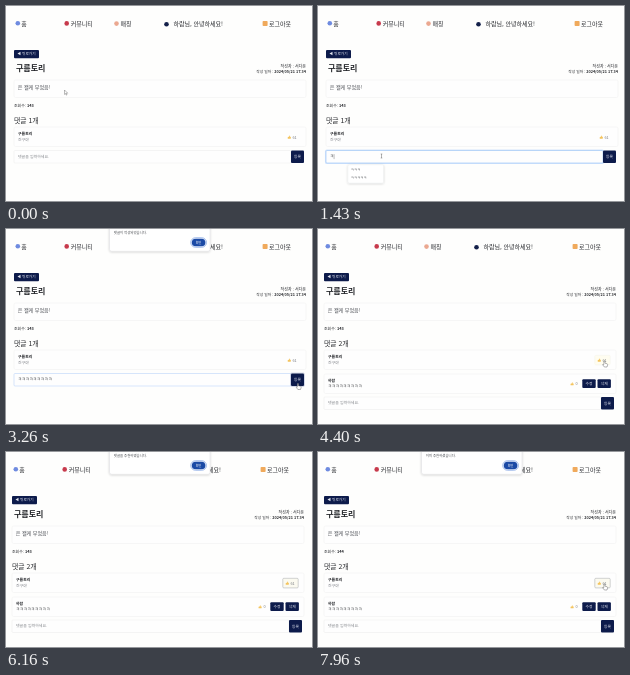
These frames come from a looping animation (306x195 px, 8000 ms). An HTML page:

```html
<!DOCTYPE html>
<html lang="ko">
<head>
<meta charset="utf-8">
<title>댓글</title>
<style>
html, body { margin: 0; width: 100%; height: 100%; overflow: hidden; background: #fefefd; }
svg { display: block; width: 100vw; height: 100vh; }
text { font-family: "Noto Sans CJK KR", "Noto Sans CJK", "Noto Sans", sans-serif; white-space: pre; }
</style>
</head>
<body>
<svg viewBox="0 0 306 195">
  <defs>
    <filter id="shadow" x="-10%" y="-20%" width="120%" height="150%">
      <feDropShadow dx="0" dy="0.6" stdDeviation="1" flood-opacity="0.2"/>
    </filter>
  </defs>
  <g id="page"></g>
  <g id="dialog"></g>
  <g id="pointer"></g>
</svg>
<script>
const LOOP = 8000;
const NAVY = '#0d1b4b', INK = '#25272b', GRAY = '#777a80', LINE = '#eeefef';
const USER = '하람', AUTHOR = '서다온', TITLE = '구름토리', LAUGH = 'ㅋ';

const FOCUS = 740, TYPING = 1360, CLICK = 2880, POSTED = 3700, LIKED = 6800;
const ALERTS = [
  { from: 3000, to: 3600, text: '댓글이 작성되었습니다.' },
  { from: 4750, to: 6400, text: '댓글을 추천하였습니다.' },
  { from: 7250, to: LOOP, text: '이미 추천하셨습니다.' }
];
// time, x, y
const PATH = [
  [0, 58.5, 84], [150, 58.5, 84], [650, 63.5, 150], [2300, 63.5, 150],
  [2650, 291.5, 154.5], [3620, 291.5, 154.5], [4100, 286, 132], [LOOP, 286, 132]
];

const el = id => document.getElementById(id);

// y is the vertical middle of the line
const text = (str, x, y, size, { fill = INK, weight = 400, anchor = 'start' } = {}) =>
  `<text x="${x}" y="${y + size * 0.36}" font-size="${size}" fill="${fill}" font-weight="${weight}" text-anchor="${anchor}">${str}</text>`;

const rect = (x, y, w, h, fill, { stroke = 'none', r = 1, line = 0.5, extra = '' } = {}) =>
  `<rect x="${x}" y="${y}" width="${w}" height="${h}" rx="${r}" fill="${fill}" stroke="${stroke}" stroke-width="${line}" ${extra}/>`;

const circle = (x, y, r, fill) => `<circle cx="${x}" cy="${y}" r="${r}" fill="${fill}"/>`;

const button = (label, x, y, w, h, size = 3.8) =>
  rect(x, y, w, h, NAVY) +
  text(label, x + w / 2, y + h / 2, size, { fill: '#e3e6f0', weight: 500, anchor: 'middle' });

const card = (y, h) => rect(8, y, 292, h, '#fefefe', { stroke: LINE, r: 1.5 });

const thumb = (x, y) =>
  `<path transform="translate(${x} ${y}) scale(.8)" fill="#f4c45e" d="M-1.8 -.2h1L.2 -2q.9 0 .6 1.5h1.1q.5.4 0 2.4h-3.7z"/>`;

function nav() {
  const label = (str, x) => text(str, x, 17.4, 6, { weight: 500 });
  return circle(11.8, 17.3, 2.3, '#6f8be0') + label('홈', 15.3) +
    circle(60.7, 17.4, 2.3, '#c73a4c') + label('커뮤니티', 64.8) +
    circle(110.5, 17.6, 2.3, '#eba890') + label('매칭', 114.5) +
    circle(160.5, 18.2, 2.3, '#14204a') + label(`${USER}님, 안녕하세요!`, 167.5) +
    rect(256.6, 15, 5, 5, '#f0aa5c', { r: 0.8 }) + label('로그아웃', 263);
}

function article(views) {
  const right = { anchor: 'end' };
  return button('◀ 뒤로가기', 8, 44, 25, 8.3, 3.7) +
    text(TITLE, 10, 62, 8, { weight: 700 }) +
    text(`작성자 : ${AUTHOR}`, 300, 60.2, 4, right) +
    text('작성 일자 : <tspan font-weight="700">2024/05/21 17:34</tspan>', 300, 66, 3.75, right) +
    card(74, 17.5) + text('은 왤케 부었음!', 11.8, 81, 5.1, { fill: '#4b4e54', weight: 500 }) +
    text(`조회수: <tspan font-weight="700">${views}</tspan>`, 8, 99.7, 3.9);
}

function likeBox(state) {
  if (!state) return '';
  const pressed = state === 2;
  return rect(278.8, 126.3, 15.4, 9.6, pressed ? '#fbfaf0' : '#fffdf0',
    { stroke: pressed ? '#a3a6aa' : '#f3f3ec' });
}

function comments(s) {
  let out = text(`댓글 ${s.posted ? 2 : 1}개`, 8, 115, 6.8) + card(121, 19.5) +
    text(TITLE, 12, 127.4, 3.9, { weight: 700 }) +
    text('친구야', 12, 133.6, 3.9, { fill: GRAY }) +
    likeBox(s.like) + thumb(283.2, 131.2) + text('61', 286.5, 131.2, 3.8, { fill: GRAY });
  if (s.posted) {
    out += card(145, 19.5) +
      text(USER, 12, 151.2, 3.9, { weight: 700 }) + text(LAUGH.repeat(9), 12, 157.4, 4.1) +
      thumb(256, 154.8) + text('0', 259.5, 154.8, 3.8, { fill: GRAY }) +
      button('수정', 266.3, 150.2, 13.4, 8.8) + button('삭제', 281.5, 150.2, 13.4, 8.8);
  }
  return out;
}

function form(s) {
  const y = s.posted ? 168 : 144.5;
  let out = '';
  if (s.focus === 2) out += rect(7.6, y - 0.4, 277.8, 13.3, 'none', { stroke: '#d6e6fc', line: 1.3 });
  out += rect(8, y, 277, 12.5, '#fefefe', { stroke: [LINE, '#bcd6fa', '#94c1f6'][s.focus], line: 0.6 });
  out += s.typed
    ? text(LAUGH.repeat(s.typed), 12, y + 6, 4.1)
    : text('댓글을 입력하세요.', 12, y + 6, 3.95, { fill: '#85888d' });
  if (s.caret) out += rect(12.1 + s.typed * 3.77, y + 3.6, 0.3, 5, INK, { r: 0 });
  if (s.focus === 1) out += rect(284.6, y - 0.4, 13.8, 13.3, 'none', { stroke: '#c4cbe0', line: 0.8 });
  out += button('등록', 285, y, 13, 12.5);
  if (s.list) {
    out += rect(30, 158.8, 35.5, 18.2, '#fff', { stroke: '#ebecee', line: 0.4, extra: 'filter="url(#shadow)"' }) +
      text(LAUGH.repeat(3), 32.7, 163.8, 3.5, { fill: '#44474c' }) +
      text(LAUGH.repeat(5), 32.7, 171.6, 3.5, { fill: '#44474c' });
  }
  return out;
}

const page = s =>
  `<g transform="translate(${s.posted ? -2 : 0} 0)">${nav()}${article(s.views)}${comments(s)}${form(s)}</g>`;

const dialog = (message, opacity) =>
  `<g opacity="${opacity}">` +
  rect(103.5, -30, 100.5, 52.3, '#fff', { r: 2, stroke: '#d4d5d8', line: 0.4, extra: 'filter="url(#shadow)"' }) +
  text(message, 107.8, 3.5, 3.4, { fill: '#44474c' }) +
  rect(184.8, 8.8, 15.6, 9.4, 'none', { r: 4.6, stroke: '#7fa3e4', line: 0.8 }) +
  rect(185.8, 9.7, 13.6, 7.6, '#1b4aa6', { r: 3.8 }) +
  text('확인', 192.6, 13.5, 3.2, { fill: '#fff', weight: 500, anchor: 'middle' }) + '</g>';

const POINTERS = {
  arrow: '<path d="M0 0v4.4l1-.9 .7 1.6 .8-.4-.7-1.5h1.4z" fill="#fff" stroke="#555" stroke-width=".4"/>',
  beam: '<path d="M-.8-2h1.6M0-2v4M-.8 2h1.6" fill="none" stroke="#555" stroke-width=".45"/>',
  hand: '<path d="M0 0q.7-.4 1 .2v2l2.2.6q.6.3.4 1.3l-.6 1.9h-2.6l-1.8-2.4q.2-.7 1.2 0z" fill="#fff" stroke="#444" stroke-width=".4"/>'
};

function position(t) {
  const i = PATH.findIndex(p => p[0] > t);
  const [t0, x0, y0] = PATH[i - 1], [t1, x1, y1] = PATH[i];
  const k = (t - t0) / (t1 - t0), e = k * k * (3 - 2 * k);
  return [x0 + (x1 - x0) * e, y0 + (y1 - y0) * e];
}

function pointer(t) {
  if (t > 5200 && t < 6650) return '';
  const [x, y] = position(t);
  const overInput = t < POSTED && y > 144 && y < 157 && x < 285;
  const overButton = (t < POSTED && x >= 285 && y > 144) || (t >= 4000 && x > 277);
  const kind = overInput ? 'beam' : overButton ? 'hand' : 'arrow';
  return `<g transform="translate(${x.toFixed(2)} ${y.toFixed(2)})">${POINTERS[kind]}</g>`;
}

function stateAt(t) {
  const posted = t >= POSTED;
  const typed = posted || t < TYPING ? 0 : Math.min(9, 1 + Math.floor((t - TYPING) / 105));
  const pressed = (t > 4650 && t < 6450) || t > 7150;
  return {
    posted, typed,
    views: t < LIKED ? 143 : 144,
    focus: posted || t < FOCUS ? 0 : t < CLICK ? 2 : 1,
    caret: t >= FOCUS && t < 2500 && (typed > 0 || t - FOCUS < 500),
    list: t >= TYPING + 30 && t < 1880,
    like: pressed ? 2 : t > 4050 && t < 5200 ? 1 : 0
  };
}

const shown = {};
function put(id, markup) {
  if (shown[id] !== markup) el(id).innerHTML = shown[id] = markup;
}

function draw(now) {
  const t = now % LOOP;
  const alert = ALERTS.find(a => t >= a.from && t < a.to);
  put('page', page(stateAt(t)));
  put('dialog', alert ? dialog(alert.text, Math.min(1, (t - alert.from) / 80)) : '');
  put('pointer', pointer(t));
}

let start;
function tick(now) {
  start ??= now;
  draw(now - start);
  requestAnimationFrame(tick);
}
draw(0);
requestAnimationFrame(tick);
</script>
</body>
</html>
```
